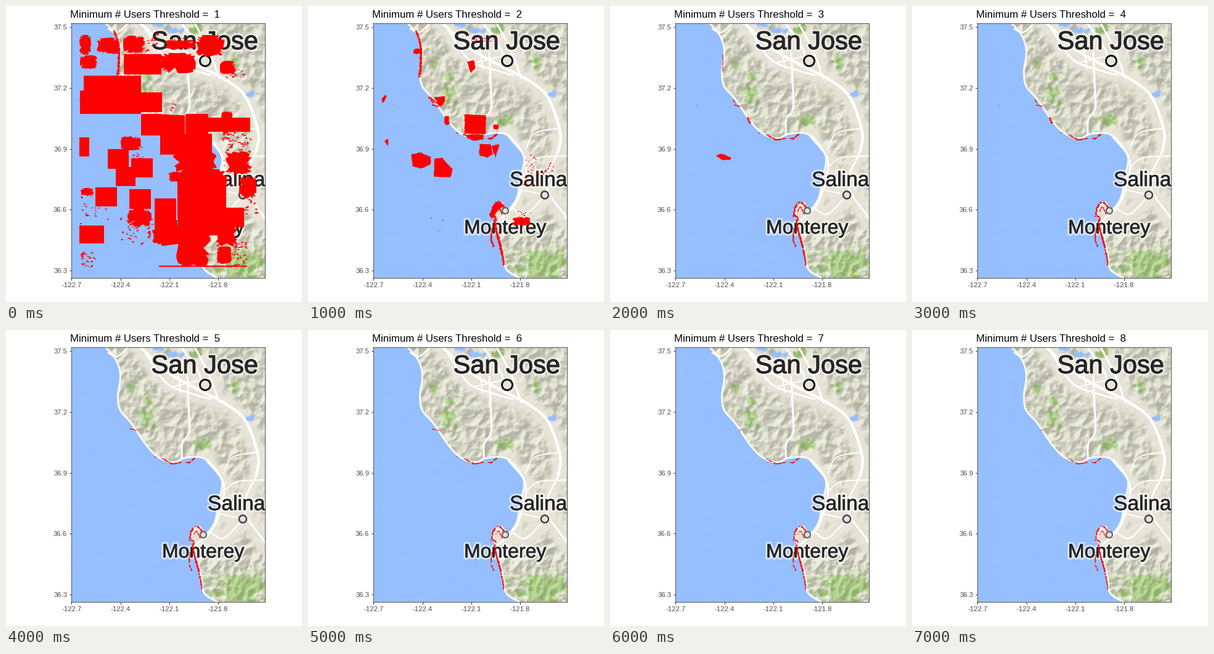
A matplotlib script that plays this animation: 480 by 480 pixels, repeating every 8 s.

```python
import numpy as np
import matplotlib.pyplot as plt
from matplotlib.animation import FuncAnimation
from matplotlib.collections import LineCollection, PolyCollection
from matplotlib.patches import Circle
from matplotlib.path import Path
from matplotlib.patheffects import Normal, Stroke

SIZE = 480
LEFT, TOP, RIGHT, BOTTOM = 105.5, 27.5, 419.5, 441
LEVELS = 8
RED = "#ff0000"
plt.rcParams["font.family"] = "Liberation Sans"
rng = np.random.default_rng(12)

# ---- geography, in stage pixels; lines are smoothed through these points ---
COAST = [(157, 25), (176, 47), (184, 74), (180, 108), (184, 131), (202, 152),
         (226, 187), (246, 207), (270, 215), (288, 208), (315, 207),
         (333, 219), (349, 246), (343, 280), (337, 312), (322, 331),
         (311, 319), (299, 331), (304, 352), (315, 398), (320, 427),
         (344, 443)]
# line width, path
VALLEY_ROADS = [
    (4.5, [(216, 26), (262, 68), (312, 97), (355, 119), (389, 148),
           (409, 205), (406, 235)]),
    (3, [(406, 235), (386, 290), (421, 346)]),
    (3, [(224, 34), (260, 86), (304, 104), (332, 112)]),
    (3, [(283, 26), (314, 72), (311, 97)]),
    (3, [(305, 26), (329, 72), (346, 117)]),
    (2, [(270, 92), (330, 78)]),
    (2, [(275, 52), (284, 101)]),
    (2.5, [(331, 328), (352, 338), (376, 316), (386, 306)]),
    (2, [(345, 298), (384, 306)]),
    (3, [(324, 210), (353, 250), (345, 300), (331, 328), (306, 350)]),
]
HILL_ROADS = [
    (3, [(294, 76), (296, 122), (297, 165), (286, 184), (285, 208)]),
    (2.5, [(166, 37), (180, 43), (200, 26)]),
    (2, [(353, 232), (368, 206), (409, 198)]),
    (2, [(353, 262), (375, 246), (420, 243)]),
]
# centre and radii
FORESTS = [(228, 114, 11, 7), (228, 145, 13, 14), (320, 187, 13, 10),
           (308, 38, 11, 13), (369, 86, 8, 13), (204, 97, 5, 8),
           (234, 201, 9, 6), (382, 422, 44, 27)]
LAKES = [(249, 29, 12, 6), (270, 41, 13, 6), (393, 144, 6, 6)]

# ---- red areas: boxes are x0, y0, x1, y1 -----------------------------------
BLOCKS = [(191, 78, 252, 111), (120, 137, 219, 175), (126, 113, 219, 140),
          (219, 140, 253, 172), (219, 175, 253, 210), (253, 177, 290, 207),
          (291, 175, 328, 207), (328, 181, 396, 204), (250, 207, 334, 241),
          (119, 213, 135, 244), (165, 232, 199, 264), (178, 261, 210, 292),
          (203, 247, 238, 278), (145, 294, 180, 325), (119, 356, 159, 385),
          (200, 297, 235, 329), (241, 312, 276, 384), (278, 280, 357, 372),
          (350, 327, 386, 359), (248, 421, 391, 423)]
BLOBS = [(119, 47, 138, 79), (120, 80, 148, 102), (147, 51, 184, 77),
         (190, 48, 225, 76), (250, 76, 308, 109), (256, 55, 309, 70),
         (308, 47, 354, 82), (347, 89, 373, 111), (349, 170, 368, 206),
         (186, 211, 219, 234), (270, 236, 342, 271), (263, 269, 288, 285),
         (279, 264, 358, 300), (356, 236, 399, 274), (378, 276, 406, 312),
         (237, 355, 300, 389), (276, 362, 332, 423), (342, 356, 375, 390),
         (342, 390, 366, 418), (197, 329, 236, 358), (121, 295, 142, 308)]
# drop out after the second threshold
PATCHES = [
    [(254, 176), (289, 177), (288, 208), (254, 207)],
    [(278, 224), (296, 224), (300, 240), (291, 246), (278, 243)],
    [(297, 228), (311, 223), (304, 246)],
    [(167, 241), (183, 237), (199, 245), (199, 257), (183, 264), (170, 260)],
    [(205, 248), (217, 246), (235, 265), (231, 278), (204, 277)],
    [(120, 150), (126, 143), (127, 148), (121, 159)],
    [(124, 218), (130, 215), (130, 228)],
    [(205, 148), (223, 146), (221, 158), (213, 164)],
    [(258, 90), (270, 88), (271, 100), (264, 109)],
    [(294, 338), (303, 319), (318, 322), (306, 334), (298, 346)],
]
SMALL = [(258, 208, 286, 217), (300, 192, 309, 200), (221, 178, 229, 193),
         (332, 342, 361, 356), (171, 69, 183, 78)]
SLICK = [(172, 243), (180, 239), (197, 246), (196, 249), (182, 250)]
# highest threshold, box, count
SPECKS = [
    (1, 196, 46, 250, 76, 26), (1, 264, 145, 280, 180, 5),
    (1, 350, 205, 397, 238, 48), (1, 354, 95, 389, 122, 12),
    (1, 186, 330, 238, 388, 46), (1, 120, 398, 145, 424, 20),
    (1, 122, 308, 170, 353, 22), (1, 340, 380, 390, 424, 55),
    (1, 388, 312, 407, 341, 12), (1, 205, 228, 222, 247, 9),
    (2, 264, 50, 306, 58, 16), (2, 352, 240, 371, 266, 14),
    (2, 380, 250, 399, 273, 16), (2, 350, 266, 380, 294, 14),
    (2, 332, 333, 362, 358, 22), (2, 195, 343, 225, 367, 4),
    (3, 265, 51, 290, 57, 8), (3, 254, 177, 288, 191, 4),
    (4, 280, 52, 286, 56, 2), (4, 139, 161, 141, 163, 1),
    (6, 271, 372, 275, 375, 2)]
# highest threshold, width, path
SHORES = [
    (8, 2.7, [(297, 342), (301, 326), (309, 318), (319, 327)]),
    (8, 1.5, [(304, 333), (309, 326), (315, 338)]),
    (8, 3.2, [(299, 338), (305, 345), (303, 354), (312, 388)]),
    (8, 2.7, [(312, 388), (317, 413), (317, 421)]),
    (8, 2.2, [(299, 360), (297, 377), (301, 391)]),
    (8, 2, [(252, 208), (268, 216), (284, 215)]),
    (8, 2.3, [(292, 214), (297, 215), (306, 208)]),
    (8, 1.5, [(207, 162), (212, 163)]),
    (6, 1.5, [(201, 160), (208, 162)]),
    (6, 1.4, [(240, 205), (244, 207)]),
    (4, 1.6, [(200, 152), (203, 158)]),
    (4, 3.2, [(223, 181), (228, 192)]),
    (3, 1, [(183, 80), (183, 106)]),
    (2, 2.6, [(175, 40), (182, 62), (183, 95), (180, 116)]),
    (2, 2, [(196, 148), (216, 162)]),
]


def smooth(pts, n=8):
    """Catmull-Rom curve through the points."""
    p = np.array(pts, float)
    p = np.vstack([2 * p[0] - p[1], p, 2 * p[-1] - p[-2]])
    t = np.linspace(0, 1, n, endpoint=False)[:, None]
    curve = [b + t / 2 * (c - a + t * (2 * a - 5 * b + 4 * c - d
                                       + t * (3 * (b - c) + d - a)))
             for a, b, c, d in zip(p, p[1:], p[2:], p[3:])]
    return np.vstack(curve + [p[-2:-1]])


def resample(pts, step):
    p = np.array(pts, float)
    d = np.r_[0, np.cumsum(np.hypot(*np.diff(p, axis=0).T))]
    t = np.linspace(0, d[-1], max(2, int(d[-1] / step)))
    return np.c_[np.interp(t, d, p[:, 0]), np.interp(t, d, p[:, 1])]


# ---- terrain ---------------------------------------------------------------
W, H = 315, 414
freq = np.hypot(np.fft.fftfreq(H)[:, None], np.fft.fftfreq(W)[None, :])
gx, gy = np.meshgrid(np.arange(W) + 105.5, np.arange(H) + 27.5)
shore = smooth(COAST)


def blur(a, s):
    return np.fft.ifft2(np.fft.fft2(a) * np.exp(-2 * (np.pi * s * freq) ** 2)).real


def noise(s):
    n = blur(rng.normal(size=(H, W)), s)
    return n / n.std()


def mix(a, color, m):
    m = np.clip(m, 0, 1)[..., None]
    return a * (1 - m) + np.array(color) * m


def ellipse(cx, cy, rx, ry, rough):
    return 4 * (1 - np.hypot((gx - cx) / rx, (gy - cy) / ry) - rough)


def valley():
    """Flat ground lies along the valley roads."""
    near = np.full((H, W), 1e9)
    for _, pts in VALLEY_ROADS:
        for x, y in resample(pts, 5):
            near = np.minimum(near, np.hypot(gx - x, gy - y))
    return 1.6 - near / 14 + 0.15 * noise(5)


def terrain():
    height = -6 * abs(noise(6)) - 2.6 * abs(noise(3)) - 0.8 * abs(noise(1.6))
    dy, dx = np.gradient(blur(height, 0.8))
    slope = dx + dy
    shade = np.tanh(slope / slope.std() * 0.8)[..., None]
    rgb = np.array([207, 208, 192]) + 33 * shade
    rgb = mix(rgb, [234, 230, 219], np.clip(valley(), 0, 0.9))
    rough = 0.3 * noise(2.5)
    for f in FORESTS:
        rgb = mix(rgb, np.array([165, 199, 126]) + 28 * shade,
                  np.clip(ellipse(*f, rough), 0, 0.9))
    edge = Path(np.vstack([shore, [(425, 443), (425, 25)]]))
    land = edge.contains_points(np.c_[gx.ravel(), gy.ravel()]).reshape(H, W)
    sea = blur(1.0 - land, 0.7)
    sea[:, -9:] = 0
    for water in [sea] + [ellipse(*k, rough) for k in LAKES]:
        rgb = mix(rgb, [149, 191, 255], water)
    return np.clip(rgb / 255, 0, 1)


# ---- red helpers -----------------------------------------------------------
def box(x0, y0, x1, y1):
    return [(x0, y0), (x1, y0), (x1, y1), (x0, y1)]


def ragged(pts, amount):
    p = resample(pts + pts[:1], 3)
    return p + rng.normal(0, amount, p.shape)


def blob(x0, y0, x1, y1):
    """Rounded box with a bitten edge."""
    a = np.linspace(0, 2 * np.pi, 44, endpoint=False)
    r = 1 - 0.16 * abs(rng.normal(size=a.size)) * (rng.random(a.size) < 0.5)
    u, v = (np.sign(f(a)) * abs(f(a)) ** 0.5 * r for f in (np.cos, np.sin))
    return np.c_[(x0 + x1 + u * (x1 - x0)) / 2, (y0 + y1 + v * (y1 - y0)) / 2]


def speck(x, y, size):
    a = np.sort(rng.uniform(0, 2 * np.pi, 6))
    r = size * rng.uniform(0.4, 1.1, 6)
    tilt = rng.uniform(-0.8, 0.8)
    u, v = r * np.cos(a), 0.55 * r * np.sin(a)
    c, s = np.cos(tilt), np.sin(tilt)
    return np.c_[x + u * c - v * s, y + u * s + v * c]


def red_areas():
    areas = [(1, box(*b)) for b in BLOCKS]
    areas += [(1, blob(*b)) for b in BLOBS]
    areas += [(2, ragged(p, 0.35)) for p in PATCHES]
    areas += [(2, blob(*b)) for b in SMALL]
    areas.append((3, ragged(SLICK, 0.3)))
    for top, x0, y0, x1, y1, count in SPECKS:
        size = max(1.2, 4.6 - 1.2 * top)
        for x, y in rng.uniform((x0, y0), (x1, y1), (count, 2)):
            areas.append((top, speck(x, y, size)))
    return areas


def shore_parts():
    parts = []
    for top, width, pts in SHORES:
        p = resample(smooth(pts), 1.5)
        p += rng.normal(0, 0.4, p.shape)
        for a, b in zip(p[:-1], p[1:]):
            parts.append((top, width * rng.uniform(0.5, 1.2), rng.random(), [a, b]))
    return parts


# ---- figure ----------------------------------------------------------------
fig = plt.figure(figsize=(SIZE / 72, SIZE / 72), dpi=72, facecolor="white")
ax = fig.add_axes([LEFT / SIZE, 1 - BOTTOM / SIZE,
                   (RIGHT - LEFT) / SIZE, (BOTTOM - TOP) / SIZE])
ax.imshow(terrain(), extent=(105, 420, 441, 27), aspect="auto",
          interpolation="bilinear")
ax.set(xlim=(LEFT, RIGHT), ylim=(BOTTOM, TOP))
ax.set_xticks([106.5 + 79 * i for i in range(4)],
              [f"{-122.7 + 0.3 * i:.1f}" for i in range(4)])
ax.set_yticks([34 + 98.75 * i for i in range(5)],
              [f"{37.5 - 0.3 * i:.1f}" for i in range(5)])
ax.tick_params(length=3.5, width=1, color="#333333", labelcolor="#4d4d4d",
               labelsize=11.2, pad=2.8)
ax.tick_params(axis="x", pad=4)
for spine in ax.spines.values():
    spine.set(color="#555555", linewidth=1, zorder=9)

ax.plot(*(shore + (1.5, -0.5)).T, color="#f8f8f4", lw=3, zorder=2)
for width, pts in VALLEY_ROADS + HILL_ROADS:
    ax.plot(*smooth(pts).T, color="white", lw=width, zorder=2)


def place(x, y, name, size, weight):
    ax.text(x, y, name, size=size, color="#262626", clip_on=True, zorder=4,
            path_effects=[Stroke(linewidth=7, foreground=(1, 1, 1, 0.45)),
                          Stroke(linewidth=4, foreground=(1, 1, 1, 0.5)),
                          Stroke(linewidth=weight, foreground="#262626"),
                          Normal()])


def town(x, y, r, width, color):
    ax.add_patch(Circle((x, y), r, fc="#e6e4de", ec=color, lw=width, zorder=3))


town(323, 89, 8.5, 3, "#111111")
town(384, 306.5, 6, 2.5, "#444444")
town(320, 332, 5, 2.3, "#666666")
place(235.5, 70, "San Jose", 41.6, 1.2)
place(327, 292, "Salinas", 33.6, 0.6)
place(253, 369, "Monterey", 32, 0.6)

AREAS, PARTS = red_areas(), shore_parts()
fill = PolyCollection([], facecolor=RED, edgecolor="none", zorder=6)
lines = LineCollection([], colors=RED, capstyle="butt", zorder=6)
ax.add_collection(fill, autolim=False)
ax.add_collection(lines, autolim=False)
title = fig.text(104 / SIZE, 1 - 19 / SIZE, "", size=16.8, color="black")


def update(i):
    level = i + 1
    scale = 1.6 if level < 3 else 1.15 - 0.06 * (level - 3)
    gap = 0.03 * max(0, level - 2)
    shown = [p for p in PARTS if p[0] >= level and p[2] >= gap]
    fill.set_verts([pts for top, pts in AREAS if top >= level])
    lines.set_segments([p[3] for p in shown])
    lines.set_linewidths([p[1] * scale for p in shown])
    title.set_text(f"Minimum # Users Threshold =  {level}")
    return fill, lines, title


anim = FuncAnimation(fig, update, frames=LEVELS, interval=1000, repeat=True,
                     repeat_delay=0, blit=False)
plt.show()
```
